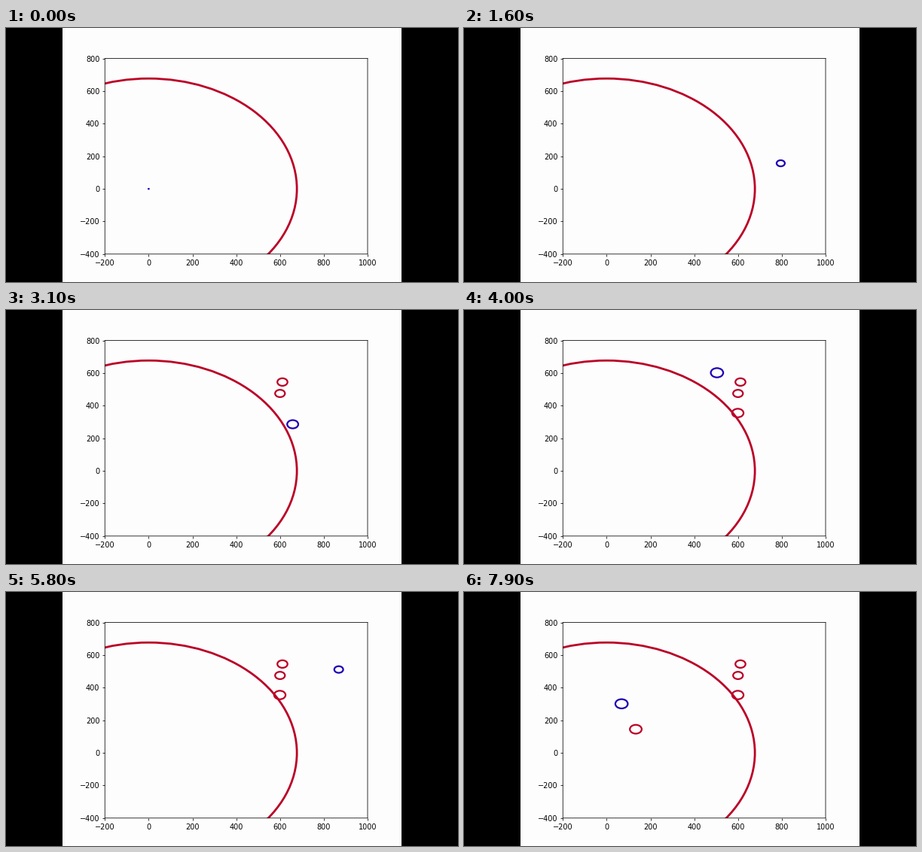
Recreate the animation shown at these times as a matplotlib script. Size 600x338 px, loop 8 s.

```python
import numpy as np
import matplotlib.pyplot as plt
from matplotlib.animation import FuncAnimation
from matplotlib.patches import Circle, Rectangle

FRAMES, STEP = 80, 100
W, H = 600, 338
SCALE = 450 / 640
RED, BLUE, PAPER = "#ba0026", "#1c00b4", "#fefdfe"
LINE = 1.6

# Points are complex: x + yj. Each leg is (end frame, points), at even speed.
RINGS = [600 + 475j, 611 + 545j, 599 + 355j, 133 + 145j]
LEGS = [
    (16, [795 + 157j]),
    (31, [RINGS[0], RINGS[1], 658 + 286j]),
    (40, [RINGS[2], 504 + 602j]),
    (50, [696 + 123j]),
    (67, [885 + 520j, 408 + 278j]),
    (79, [RINGS[3], 68 + 301j]),
]

times, path = [0.0], [0j]
for end, points in LEGS:
    start = times[-1]
    dist = np.cumsum(np.abs(np.diff([path[-1], *points])))
    times.extend(start + (end - start) * dist / dist[-1])
    path.extend(points)


def radius(n):
    """Grow quickly at first, then slowly; shrink back once after the fourth leg."""
    age = n if n <= 50 else n - 39
    return max(2.5, 5.4 * age ** 0.45)


plt.rcParams["font.family"] = "DejaVu Sans"
plt.rcParams["path.snap"] = False
fig = plt.figure(figsize=(W / 100, H / 100), dpi=100, facecolor="black")
fig.add_artist(Rectangle((75 / W, 0), 450 / W, 1, fc=PAPER, ec="none",
                         transform=fig.transFigure, zorder=-1))
ax = fig.add_axes([131.25 / W, 0.11, 348.75 / W, 0.77], facecolor=PAPER)
ax.set(xlim=(-200, 1000), ylim=(-400, 800))
ax.tick_params(labelsize=10 * SCALE, length=3.5 * SCALE,
               width=0.8 * SCALE, pad=3.5 * SCALE)
for spine in ax.spines.values():
    spine.set_linewidth(0.8 * SCALE)


def ring(center, r, color, lw=LINE):
    return ax.add_patch(Circle((center.real, center.imag), r,
                               fill=False, ec=color, lw=lw))


ring(0j, 677, RED, 2)
drops = [times[path.index(p)] for p in RINGS]
marks = [ring(p, radius(t), RED) for p, t in zip(RINGS, drops)]
probe = ring(0j, radius(0), BLUE)


def draw(n):
    pos, r = np.interp(n, times, path), radius(n)
    probe.center = pos.real, pos.imag
    probe.set_radius(r)
    probe.set_linewidth(min(LINE, 0.4 * r))
    for t, mark in zip(drops, marks):
        mark.set_visible(n > t)
    return [probe, *marks]


anim = FuncAnimation(fig, draw, frames=FRAMES, interval=STEP,
                     repeat=True, repeat_delay=0)
plt.show()
```
